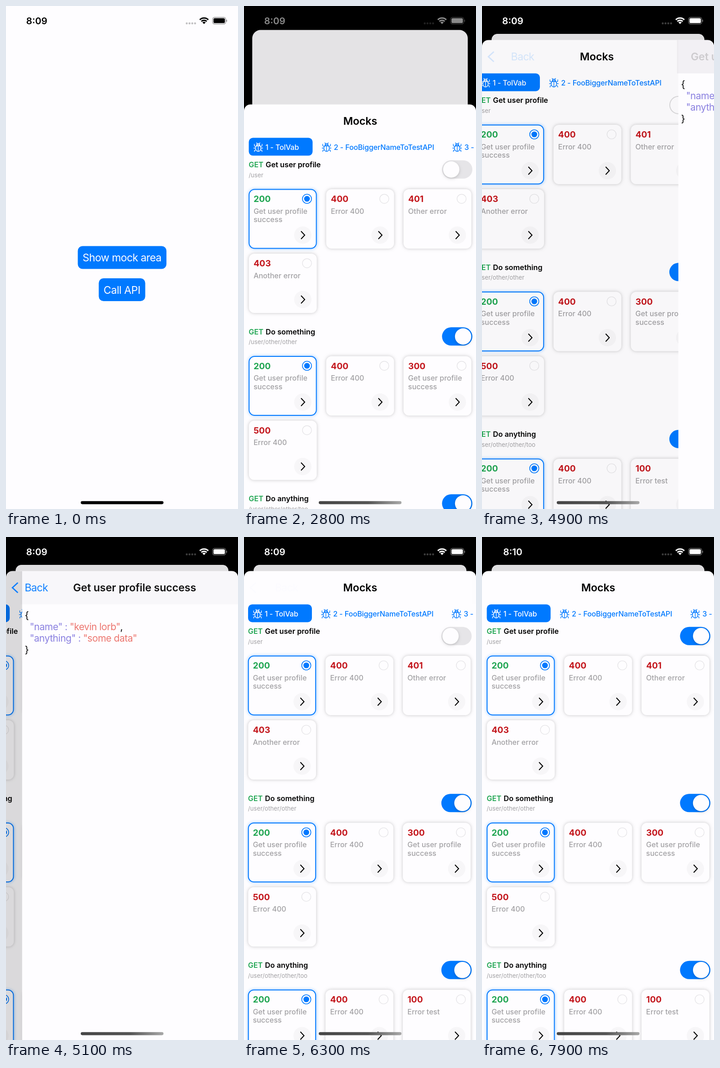
Recreate the animation shown at these times as an HTML page with a canvas. Size 509x1101 px, loop 8 s.

```html
<!DOCTYPE html>
<html lang="en">
<head>
<meta charset="utf-8">
<title>Mock area</title>
<style>
html, body { margin: 0; width: 100%; height: 100%; overflow: hidden; background: #fefdff; }
canvas { display: block; width: 509px; height: 1101px; }
</style>
</head>
<body>
<canvas id="stage" width="509" height="1101"></canvas>
<script>
const W = 509, H = 1101, LOOP = 8000, STEP = 100;
const SHEET_TOP = 74.5, NAV_BOTTOM = 147.5;
const RISE_START = 2609, PUSH_START = 4862, POP_START = 5936;
const BLUE = '#0079ff', WHITE = '#fefdff', GREEN = '#1fa551', RED = '#c3161c', GRAY = '#a2a1a4';
const ctx = document.getElementById('stage').getContext('2d');

const sections = [
  { y: 206, title: 'Get user profile', path: '/user', cards: [
    [200, 'Get user profile', 'success'], [400, 'Error 400'], [401, 'Other error'], [403, 'Another error']] },
  { y: 571.5, title: 'Do something', path: '/user/other/other', cards: [
    [200, 'Get user profile', 'success'], [400, 'Error 400'], [300, 'Get user profile', 'success'], [500, 'Error 400']] },
  { y: 937, title: 'Do anything', path: '/user/other/other/too', cards: [
    [200, 'Get user profile', 'success'], [400, 'Error 400'], [100, 'Error test']] }
];

const clamp = v => Math.min(1, Math.max(0, v));
const smooth = v => { v = clamp(v); return v * v * (3 - 2 * v); };

// Critically damped spring from 0 to 1.
function spring(t, start) {
  const u = Math.max(0, t - start) * 0.01825;
  return 1 - (1 + u) * Math.exp(-u);
}

function group(draw) {
  ctx.save();
  draw();
  ctx.restore();
}

function box(x, y, w, h, r, fill) {
  ctx.beginPath();
  ctx.roundRect(x, y, w, h, r);
  if (fill) { ctx.fillStyle = fill; ctx.fill(); }
}

function disc(x, y, r, fill) {
  ctx.beginPath();
  ctx.arc(x, y, r, 0, Math.PI * 2);
  if (fill) { ctx.fillStyle = fill; ctx.fill(); }
}

function stroke(color, width) {
  ctx.strokeStyle = color;
  ctx.lineWidth = width;
  ctx.stroke();
}

function path(...points) {
  ctx.beginPath();
  points.forEach(([x, y], i) => i ? ctx.lineTo(x, y) : ctx.moveTo(x, y));
}

// Vertically centres capital letters on cy; returns the advance width.
function text(str, x, cy, size, color, { weight = 400, align = 'left', track = 0 } = {}) {
  ctx.font = `${weight} ${size}px Inter, "Liberation Sans", sans-serif`;
  ctx.letterSpacing = `${track * size}px`;
  ctx.textAlign = align;
  ctx.fillStyle = color;
  ctx.fillText(str, x, cy + size * 0.364);
  return ctx.measureText(str).width;
}

function navTitle(str, x, align) {
  text(str, x, 111, 23.2, '#000', { weight: 600, align, track: -0.004 });
}

function statusBar(level, clock) {
  const v = Math.round(level * 255), color = `rgb(${v},${v},${v})`;
  text(clock, 67.5, 32.5, 20.5, color, { weight: 600, align: 'center' });
  group(() => {
    ctx.globalAlpha = 0.24;
    for (let i = 0; i < 4; i++) disc(396.5 + i * 6.1, 38, 2.2, color);
  });
  for (const [r, width] of [[2.6, 5.2], [8.3, 3], [13.2, 3]]) {
    ctx.beginPath();
    ctx.arc(434.5, 39.5, r, -Math.PI * 0.75, -Math.PI * 0.25);
    stroke(color, width);
  }
  group(() => {
    ctx.globalAlpha = 0.42;
    box(453.2, 24.7, 29, 14.9, 4.5);
    stroke(color, 1.4);
    box(483.3, 30, 1.8, 4.6, 1, color);
  });
  box(455.2, 26.7, 25, 10.9, 2.8, color);
}

function homeIndicator(dark) {
  let fill = '#000';
  if (!dark) {
    fill = ctx.createLinearGradient(164, 1084, 345, 1091);
    fill.addColorStop(0, '#454545');
    fill.addColorStop(0.6, '#555');
    fill.addColorStop(1, '#a8a8a8');
  }
  box(164, 1083.8, 181.5, 6.6, 3.3, fill);
}

function home(p) {
  if (p > 0) { ctx.fillStyle = '#000'; ctx.fillRect(0, 0, W, H); }
  group(() => {
    const scale = 1 - 0.0825 * p;
    ctx.translate(21 * p, 61 * p);
    ctx.scale(scale, scale);
    box(0, 0, W, H * 1.2, p > 0 ? 53 - 39 * p : 0, WHITE);
    box(157.5, 525.5, 194.5, 50, 10.5, BLUE);
    text('Show mock area', 168, 551, 23, WHITE, { track: -0.025 });
    box(203.5, 596, 102, 50, 10.5, BLUE);
    text('Call API', 214, 621.5, 23, WHITE, { track: -0.018 });
    if (p > 0) box(0, 0, W, H * 1.2, 53 - 39 * p, `rgba(0,0,0,${0.12 * p})`);
  });
}

function bug(x, y, color) {
  group(() => {
    ctx.translate(x, y);
    ctx.lineCap = 'round';
    ctx.beginPath();
    ctx.ellipse(0, 2, 5.8, 7.4, 0, 0, Math.PI * 2);
    ctx.moveTo(0, -2.5);
    ctx.lineTo(0, 9);
    ctx.moveTo(-5, -2);
    ctx.quadraticCurveTo(0, -4, 5, -2);
    ctx.moveTo(-3.6, -4);
    ctx.bezierCurveTo(-3, -9, 3, -9, 3.6, -4);
    for (const s of [-1, 1]) {
      ctx.moveTo(s * 2, -7.5); ctx.lineTo(s * 3.8, -9.5);
      ctx.moveTo(s * 5.2, -1); ctx.lineTo(s * 8.3, -3); ctx.lineTo(s * 8.6, -6.5);
      ctx.moveTo(s * 5.8, 2); ctx.lineTo(s * 9.8, 2);
      ctx.moveTo(s * 5, 5.5); ctx.lineTo(s * 8, 7); ctx.lineTo(s * 8.4, 9.5);
    }
    stroke(color, 1.35);
  });
}

function tabs() {
  box(10.5, NAV_BOTTOM, 140, 39, 9, BLUE);
  const labels = [[47, '1 - TolVab', WHITE], [197, '2 - FooBiggerNameToTestAPI', BLUE], [483.5, '3 - ', BLUE]];
  for (const [x, label, color] of labels) {
    bug(x - 15.8, 168, color);
    text(label, x, 168.5, 16, color, { weight: 500, track: -0.009 });
  }
}

function toggle(cy, on, press, hollow) {
  box(434.5, cy - 20, 66.5, 40, 20, hollow ? '#d9d8da' : '#e6e5e8');
  if (hollow) box(436.5, cy - 18, 62.5, 36, 18, WHITE);
  group(() => {
    ctx.globalAlpha = on;
    box(434.5, cy - 20, 66.5, 40, 20, BLUE);
  });
  const grow = 9 * press;
  group(() => {
    ctx.shadowColor = 'rgba(0,0,0,.18)';
    ctx.shadowBlur = hollow ? 0 : 6;
    ctx.shadowOffsetY = hollow ? 0 : 2;
    box(436.8 + on * (26 - grow), cy - 17.8, 35.8 + grow, 35.6, 17.8, WHITE);
  });
}

function card(x, y, [code, ...lines]) {
  const selected = code === 200;
  group(() => {
    ctx.shadowColor = selected ? 'rgba(0,121,255,.45)' : 'rgba(0,0,0,.22)';
    ctx.shadowBlur = 7;
    box(x, y, 149, 130, 12, WHITE);
  });
  if (selected) {
    box(x + 0.5, y + 0.5, 147.5, 129, 12);
    stroke(BLUE, 2);
  }
  text(String(code), x + 10.3, y + 21.5, 19, selected ? GREEN : RED, { weight: 700 });
  lines.forEach((line, i) => text(line, x + 10.2, y + 48 + i * 18.5, 16, GRAY, { weight: 500 }));
  disc(x + 127.5, y + 21, 10);
  stroke(selected ? BLUE : '#e2e1e4', selected ? 1.6 : 1.2);
  if (selected) disc(x + 127.5, y + 21, 6.3, BLUE);
  disc(x + 118.3, y + 100.5, 19, '#f7f6f8');
  path([x + 114.5, y + 92], [x + 122.5, y + 100.5], [x + 114.5, y + 109]);
  stroke('#000', 2);
}

function mockList(firstOn, press, hollow) {
  tabs();
  sections.forEach((s, i) => {
    text('GET', 10.3, s.y + 0.5, 16, GREEN, { weight: 600 });
    text(s.title, 47.6, s.y + 0.5, 16.2, '#000', { weight: 600 });
    text(s.path, 10.3, s.y + 23, 13.2, GRAY);
    toggle(s.y + 10.8, i ? 1 : firstOn, i ? 0 : press, !i && hollow);
    s.cards.forEach((c, n) => card(10.7 + (n % 3) * 169.6, s.y + 54 + Math.floor(n / 3) * 141, c));
  });
}

function json() {
  const key = '#8a80e0', value = '#ec766f', black = '#000';
  const rows = [
    [['{', black]],
    [['  "name" : ', key], ['"kevin lorb"', value], [',', black]],
    [['  "anything" : ', key], ['"some data"', value]],
    [['}', black]]
  ];
  rows.forEach((row, i) => {
    let x = 6;
    for (const [str, color] of row) x += text(str, x, 171 + i * 25.1, 21, color, { track: -0.022 });
  });
}

function detail(p) {
  group(() => {
    const x = W * (1 - p);
    ctx.fillStyle = WHITE;
    ctx.fillRect(x, SHEET_TOP, W, H);
    ctx.fillStyle = `rgba(90,85,110,${0.57 * p * (1 - p)})`;
    ctx.fillRect(x - 3, SHEET_TOP, W, NAV_BOTTOM - SHEET_TOP);
    ctx.translate(x, 0);
    json();
  });
}

function backButton(p, pressed) {
  group(() => {
    ctx.globalAlpha = pressed ? 0.23 : p;
    path([26, 100], [14, 111], [26, 122]);
    stroke(BLUE, 2.8);
    text('Back', 39 + 29 * (1 - p), 111, 23, BLUE, { track: -0.03 });
  });
}

function sheet(t, rise, push) {
  group(() => {
    ctx.translate(0, (H - SHEET_TOP) * (1 - rise));
    box(0, SHEET_TOP, W, H, 14, WHITE);
    ctx.clip();
    const firstOn = smooth((t - 7300) / 300);
    const press = smooth((t - 7100) / 200) * (1 - smooth((t - 7550) / 250));
    group(() => {
      ctx.translate(-153 * push, 0);
      mockList(firstOn, press, push > 0 && t < POP_START);
    });
    if (push > 0) {
      ctx.fillStyle = `rgba(0,0,0,${0.15 * push})`;
      ctx.fillRect(0, SHEET_TOP, W, H);
      detail(push);
    }
    group(() => {
      ctx.globalAlpha = clamp(1 - (push - 0.15) * 1.3);
      navTitle('Mocks', 255 - 20 * push, 'center');
    });
    if (push > 0) {
      group(() => {
        ctx.globalAlpha = push;
        navTitle('Get user profile success', 119.5 + 400 * (1 - push), 'left');
      });
      backButton(push, t === 5900);
    }
  });
}

function draw(t) {
  const rise = spring(t, RISE_START);
  const push = t < POP_START ? spring(t, PUSH_START) : 1 - spring(t, POP_START);
  ctx.fillStyle = WHITE;
  ctx.fillRect(0, 0, W, H);
  home(rise);
  if (rise > 0) sheet(t, rise, push);
  statusBar(clamp((t - RISE_START) / 350), t < 7500 ? '8:09' : '8:10');
  homeIndicator(rise === 0);
}

function tick() {
  const t = performance.now() % LOOP;
  draw(Math.floor(t / STEP) * STEP);
  requestAnimationFrame(tick);
}
tick();
</script>
</body>
</html>
```
